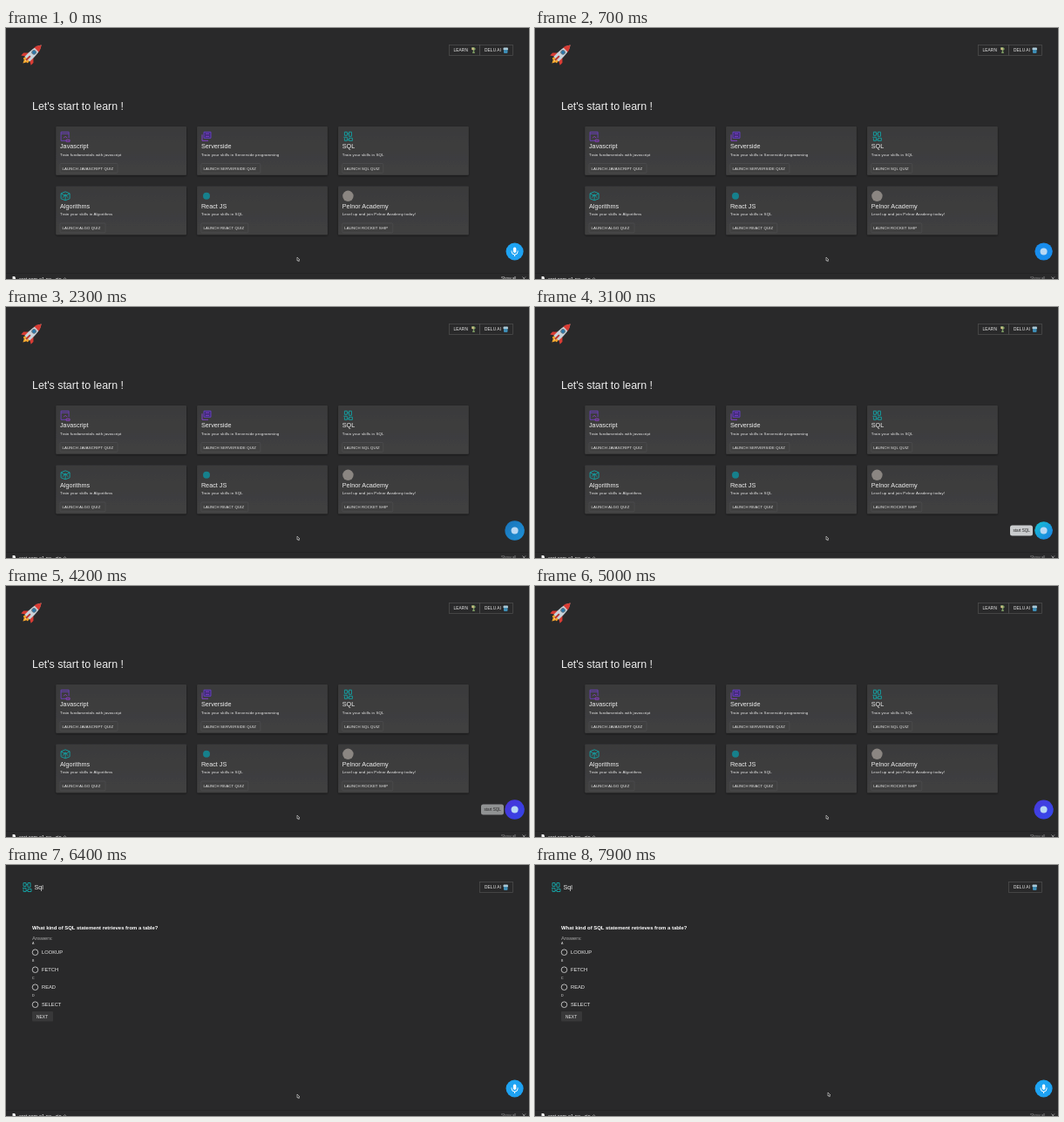
An HTML page for the animation above (8000 ms loop, 600 by 288 pixels).

```html
<!DOCTYPE html>
<html lang="en">
<head>
<meta charset="utf-8">
<title>Quiz launcher</title>
<style>
html, body { margin: 0; width: 600px; height: 288px; overflow: hidden; background: #29292a; }
svg { display: block; font-family: "Liberation Sans", Arial, sans-serif; fill: #eee; }
.title { font-size: 7.25px; }
.small { font-size: 4.4px; letter-spacing: .12px; }
.btn { font-size: 4.3px; letter-spacing: .12px; }
.nav { font-size: 4.8px; letter-spacing: .1px; }
.label { font-size: 5.75px; }
.box { fill: none; stroke: #505051; stroke-width: .7; }
.line { fill: none; stroke-width: 1; }
</style>
</head>
<body>
<svg width="600" height="288" viewBox="0 0 600 288">
  <defs>
    <linearGradient id="card" x2="0" y2="1">
      <stop stop-color="#3a3a3b"/><stop offset="1" stop-color="#404041"/>
    </linearGradient>
    <linearGradient id="glow" x2="1" y2="1">
      <stop id="c1"/><stop id="c2" offset="1"/>
    </linearGradient>
    <filter id="shadow" x="-5%" y="-10%" width="110%" height="125%">
      <feDropShadow dx="0" dy="1" stdDeviation="1" flood-opacity=".5"/>
    </filter>
    <g id="database" class="line" stroke="#169a9c">
      <path d="M-1-5H-4V-1H-1ZM1-5H4V0H1ZM-1 1H-5M-1 1V5H-4V2M1 2H5V5H1ZM-1-3H1M-1 4H1"/>
    </g>
    <g id="code" class="line" stroke="#8a3cc0">
      <path d="M-5-5H4V2M-5-5V5H1M-5-3H4" stroke="#6940b4"/>
      <path d="M-2 2L0 0 2 2M1 4H5V6H1Z"/>
    </g>
    <g id="server" class="line" stroke="#6540bd">
      <path d="M-3-5H5V2H-3Z" fill="#402a78"/>
      <path d="M-5-2V5H2M-1-3H3M-1 0H3" stroke="#8140c9"/>
    </g>
    <g id="cube" class="line" stroke="#169a9c">
      <path d="M-5-3L0-5 5-3V3L0 5-5 3ZM-5-3L0 0 5-3M0 0V5M-3 2L0-2 3 2"/>
    </g>
    <circle id="dot" r="4" fill="#16808c"/>
    <circle id="disc" r="6.2" fill="#8b8682"/>
  </defs>

  <g id="home">
    <g transform="translate(30 30) rotate(45)">
      <path d="M-3 7Q-5 12-2 11L0 15 2 11Q5 12 3 7Z" fill="#f5a52c"/>
      <path d="M-1.5 8L0 12 1.5 8Z" fill="#ffe37a"/>
      <path d="M-3 1L-8 6V10L-3 7ZM3 1L8 6V10L3 7Z" fill="#d83c34"/>
      <path d="M0-15Q5-8 4 8H-4Q-5-8 0-15Z" fill="#c9d3da"/>
      <path d="M0-15Q3-11 3.8-7H-3.8Q-3-11 0-15Z" fill="#d83c34"/>
      <circle cy="-3" r="2.3" fill="#2878ad" stroke="#667681"/>
      <path d="M-1 3H1V10H-1Z" fill="#b83230"/>
    </g>
    <rect class="box" x="508.5" y="19.5" width="35" height="12"/>
    <text class="nav" x="513.5" y="27.3">LEARN</text>
    <path d="M534 22H537L539 24 537 26 538 29H535L536 26Z" fill="#7c9b62"/>
    <circle cx="535.5" cy="24" r="1.3" fill="#d5c189"/>
    <text x="30" y="93.5" font-size="12.4">Let's start to learn !</text>
    <g id="cards"></g>
  </g>

  <g id="quiz">
    <use href="#database" x="24" y="25.5"/>
    <text class="title" x="32.5" y="27.7">Sql</text>
    <text x="30" y="73.6" font-size="5.95" font-weight="bold" fill="#fff">What kind of SQL statement retrieves from a table?</text>
    <text class="label" x="30" y="86.2" fill="#aaa">Answers:</text>
    <g id="answers"></g>
    <rect x="30" y="168" width="24" height="11.5" rx="1" fill="#383839"/>
    <text class="nav" x="35" y="175.6">NEXT</text>
  </g>

  <rect class="box" x="543.5" y="19.5" width="38" height="12"/>
  <text class="nav" x="549" y="27.3">DELU AI</text>
  <rect x="570.5" y="22.5" width="5.5" height="3" rx="1" fill="#a9c9d8"/>
  <rect x="571" y="25" width="4.5" height="4" rx="1" fill="#3e8db5"/>

  <path d="M0 281.5H600" stroke="#232324"/>
  <path d="M7.500 285H10L11 286.500V288H7.500Z" fill="#eee"/>
  <text x="15" y="290" font-size="5.5">cert.com-o1-no...zip</text>
  <path d="M66 288L67.500 286.500 69 288" class="line" stroke="#888"/>
  <text id="show" x="568" y="289.200" font-size="4.600">Show all</text>
  <path d="M592.500 285.500L596 289M596 285.500L592.500 289" stroke="#bbb" stroke-width=".7"/>

  <g id="bubble">
    <rect x="545" y="250.500" width="26" height="12" rx="2.500" fill="#c9cbcd"/>
    <text x="548.500" y="258.200" font-size="4.600" fill="#222">start SQL</text>
  </g>
  <g transform="translate(583.6 256.5)">
    <circle id="ball" fill="url(#glow)"/>
    <circle id="mark" r="4" fill="#b8d8f4"/>
    <g id="mic">
      <rect x="-1.700" y="-5" width="3.400" height="6.500" rx="1.700" fill="#fff"/>
      <path d="M-3.500-1V0A3.500 3.500 0 0 0 3.500 0V-1M0 3.500V5.500" class="line" stroke="#fff"/>
    </g>
  </g>
  <path id="cursor" d="M-1-2L2 1 .8 1.200 1.400 2.500.4 2.700 0 1.600-1 2Z" fill="#222" stroke="#ddd" stroke-width=".6"/>
</svg>
<script>
const $ = id => document.getElementById(id);
const clamp = v => Math.max(0, Math.min(1, v));
const ramp = (t, a, b) => clamp((t - a) / (b - a));

// icon, title, description, button label, button width
const cards = [
  ["code", "Javascript", "Train fundamentals with javascript", "JAVASCRIPT QUIZ", 66],
  ["server", "Serverside", "Train your skills in Serverside programming", "SERVERSIDE QUIZ", 68],
  ["database", "SQL", "Train your skills in SQL", "SQL QUIZ", 47],
  ["cube", "Algorithms", "Train your skills in Algorithms", "ALGO QUIZ", 52],
  ["dot", "React JS", "Train your skills in SQL", "REACT QUIZ", 54],
  ["disc", "Pelnor Academy", "Level up and join Pelnor Academy today!", "ROCKET SHIP", 58]
];
$("cards").innerHTML = cards.map(([icon, title, text, label, w], i) => `
  <g transform="translate(${57.3 + i % 3 * 161.9} ${113 + (i > 2) * 68.5})">
    <rect width="149.700" height="55.800" rx="1" fill="url(#card)" filter="url(#shadow)"/>
    <use href="#${icon}" x="${icon == "database" || icon == "disc" ? 11.3 : 10.8}" y="11.300"/>
    <text class="title" x="4.700" y="25.400">${title}</text>
    <text class="small" x="4.700" y="33.600">${text}</text>
    <rect class="box" x="4.700" y="42.500" width="${w}" height="10.800" rx="1"/>
    <text class="btn" x="7.200" y="49.700">LAUNCH ${label}</text>
  </g>`).join("");

$("answers").innerHTML = ["LOOKUP", "FETCH", "READ", "SELECT"].map((word, i) => `
  <g transform="translate(0 ${i * 20})">
    <text x="30" y="91.400" font-size="3.600">${"ABCD"[i]}</text>
    <circle class="line" cx="33.500" cy="100.200" r="3.300" stroke="#ddd" style="stroke-width:.8"/>
    <text class="label" x="41" y="102.300">${word}</text>
  </g>`).join("");

// time, upper colour, lower colour, radius
const glow = [
  [200, [30, 165, 242], [30, 160, 242], 10],
  [1500, [15, 100, 225], [15, 110, 232], 10.3],
  [2300, [25, 115, 185], [30, 145, 215], 11.2],
  [3100, [20, 195, 210], [30, 125, 228], 10.3],
  [4200, [75, 50, 215], [50, 70, 232], 11.2],
  [5900, [68, 62, 222], [55, 78, 242], 11]
];

function ballAt(t) {
  if (t < 200 || t >= 6000) return glow[0];
  const i = Math.max(1, glow.findIndex(k => k[0] > t));
  const [a, b] = t >= 5900 ? [glow[5], glow[5]] : [glow[i - 1], glow[i]];
  const p = a === b ? 0 : ramp(t, a[0], b[0]);
  const mix = (x, y) => x + (y - x) * p;
  const blend = n => a[n].map((v, j) => mix(v, b[n][j]));
  return [t, blend(1), blend(2), mix(a[3], b[3])];
}

function draw(now) {
  const t = now % 8000, quiz = t >= 6000;
  $("home").style.display = quiz ? "none" : "";
  $("quiz").style.display = quiz ? "" : "none";
  const [, top, bottom, r] = ballAt(t);
  $("c1").setAttribute("stop-color", `rgb(${top})`);
  $("c2").setAttribute("stop-color", `rgb(${bottom})`);
  $("ball").setAttribute("r", r);
  const listening = quiz ? 0 : ramp(t, 200, 500);
  $("mark").style.opacity = listening;
  $("mic").style.opacity = 1 - listening;
  $("bubble").style.opacity = ramp(t, 2850, 3100) * (1 - ramp(t, 4000, 4570));
  $("show").style.opacity = t < 200 ? .9 : .5;
  const move = ramp(t, 7400, 7700) * 2;
  $("cursor").setAttribute("transform", `translate(${335 + move} ${265 - move})`);
  requestAnimationFrame(draw);
}
requestAnimationFrame(draw);
</script>
</body>
</html>
```
